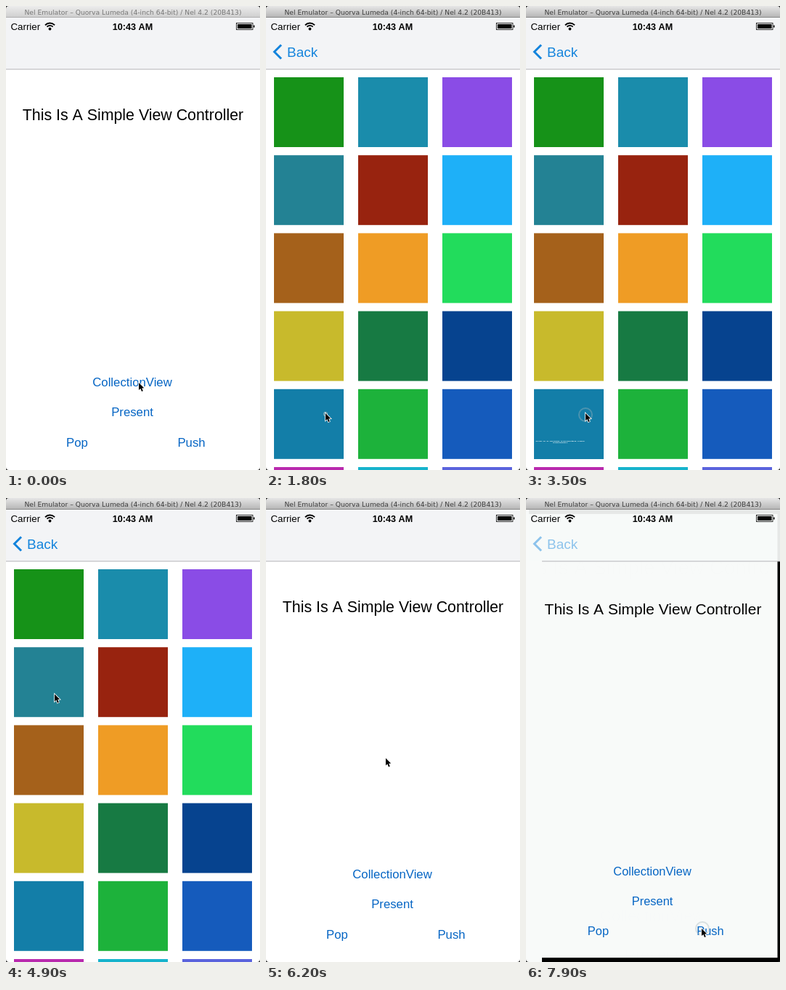
Write an HTML page with a canvas that moves like this. It is 350 px wide and 638 px high and loops after 8 s.

```html
<!DOCTYPE html>
<html lang="en">
<head>
<meta charset="utf-8">
<title>View transitions</title>
<style>
  html, body { margin: 0; width: 350px; height: 638px; overflow: hidden; background: #222; }
  canvas { display: block; border-radius: 4px; }
</style>
</head>
<body>
<canvas id="stage" width="350" height="638"></canvas>
<script>
const ctx = document.getElementById('stage').getContext('2d');
const W = 350, H = 638, TOP = 16, NAV = 87, LOOP = 8000;
const SANS = '"Liberation Sans", Arial, sans-serif';
const BLUE = '#0565c4', PAPER = '#f8faf9', PRESENTED = '#137ea8';
const CELLS = [
  '#169218', '#1a8cab', '#8a4ce6', '#238294', '#98230f', '#1eb0f8',
  '#a5611b', '#ef9c25', '#22dc5c', '#c8ba2c', '#177a43', '#06438f',
  PRESENTED, '#1db23b', '#155bbc', '#b92aae', '#16b3cc', '#5a63dd'
];
const CELL = { x: 11, y: 527, size: 96 };

// Start times of the transitions
const PUSH_GRID = 320, PRESENT = 1907, DISMISS = 3110, POP = 5524, PUSH_VIEW = 7620;

// Pointer path: time, x, y
const PATH = [
  [0, 183, 518], [950, 183, 518], [1400, 82, 560], [4300, 82, 560],
  [5300, 57, 77], [5500, 57, 77], [5600, 55, 103], [6600, 238, 527],
  [7000, 242, 592], [LOOP, 242, 592]
];
const CLICKS = [[200, 183, 519], [1800, 82, 561], [3100, 82, 562], [5400, 58, 78], [7500, 243, 592]];

const clamp = v => Math.max(0, Math.min(1, v));
const lerp = (a, b, p) => a + (b - a) * p;
const settle = (age, tau = 95) => {
  const p = 1 - Math.exp(-Math.max(0, age) / tau);
  return p > 0.997 ? 1 : p;
};

function rect(x, y, w, h, color) {
  ctx.fillStyle = color;
  ctx.fillRect(x, y, w, h);
}

function text(str, x, y, size, color, align = 'center', weight = '', family = SANS) {
  ctx.font = `${weight} ${size}px ${family}`;
  ctx.textAlign = align;
  ctx.fillStyle = color;
  ctx.fillText(str, x, y);
}

// Draws a screen scaled about the middle of the window, clipped to its own bounds
function zoomed(scale, alpha, draw) {
  if (alpha <= 0) return;
  ctx.save();
  ctx.globalAlpha = alpha;
  ctx.translate(W / 2, 327);
  ctx.scale(scale, scale);
  ctx.translate(-W / 2, -327);
  ctx.beginPath();
  ctx.rect(0, TOP, W, H - TOP);
  ctx.clip();
  draw();
  ctx.restore();
}

function labels(pressed) {
  text('This Is A Simple View Controller', 175, 157, 21.35, '#000');
  const link = (label, x, y) =>
    text(label, x, y, 16.75, label === pressed ? '#cbd6de' : BLUE);
  link('CollectionView', 174, 523);
  link('Present', 174, 564);
  link('Pop', 98, 606);
  link('Push', 255.5, 606);
}

const blank = (paper = '#fff') => rect(0, TOP, W, H - TOP, paper);

function simple(pressed, paper) {
  blank(paper);
  labels(pressed);
}

function grid() {
  blank();
  CELLS.forEach((color, i) =>
    rect(CELL.x + 116 * (i % 3), 98 + 107.2 * Math.floor(i / 3), CELL.size, CELL.size, color));
}

function navBar(back, paper = '#f3f4f6', lineFrom = 0) {
  ctx.globalAlpha = 0.93;
  rect(0, TOP, W, NAV - TOP, paper);
  ctx.globalAlpha = 1;
  rect(lineFrom, NAV - 0.5, W - lineFrom, 1, '#b4b4b7');
  ctx.globalAlpha = back;
  ctx.strokeStyle = '#1484dc';
  ctx.lineWidth = 3;
  ctx.beginPath();
  ctx.moveTo(21, 53.5);
  ctx.lineTo(11.5, 63);
  ctx.lineTo(21, 72.5);
  ctx.stroke();
  text('Back', 29, 69.5, 19, '#1484dc', 'left');
  ctx.globalAlpha = 1;
}

function statusBar() {
  text('Carrier', 6.5, 32.5, 13.3, '#000', 'left');
  text('10:43 AM', 174.5, 32.5, 12.6, '#000', 'center', 'bold');
  ctx.strokeStyle = '#000';
  ctx.lineWidth = 1.8;
  for (const r of [9, 5.6]) {
    ctx.beginPath();
    ctx.arc(60.5, 32.5, r, -Math.PI * 0.76, -Math.PI * 0.24);
    ctx.stroke();
  }
  ctx.fillStyle = '#000';
  ctx.beginPath();
  ctx.arc(60.5, 31.5, 1.9, 0, 7);
  ctx.fill();
  ctx.lineWidth = 0.8;
  ctx.strokeRect(317.5, 23.5, 22.5, 9);
  rect(319, 25, 19.5, 6, '#000');
  rect(341, 26.5, 1.5, 3, '#000');
}

function titleBar(active) {
  const fill = ctx.createLinearGradient(0, 0, 0, TOP);
  fill.addColorStop(0, active ? '#e6e6e6' : '#ececec');
  fill.addColorStop(1, active ? '#b4b4b4' : '#cecece');
  rect(0, 0, W, TOP, fill);
  rect(0, TOP - 1, W, 1, active ? '#8a8a8a' : '#b0b0b0');
  text('Nel Emulator – Quorva Lumeda (4-inch 64-bit) / Nel 4.2 (20B413)', 175, 12, 9.2,
    active ? '#3c3c3c' : '#777', 'center', '', '"DejaVu Sans", sans-serif');
}

// p = 0: inside its cell, p = 1: full screen
function presented(p) {
  ctx.globalAlpha = p;
  blank('#000');
  ctx.globalAlpha = 1;
  const x = lerp(CELL.x, 0, p), y = lerp(CELL.y, TOP, p);
  const right = lerp(CELL.x + CELL.size, W, p), bottom = lerp(CELL.y + CELL.size, H, p);
  rect(x, y, right - x, bottom - y, PRESENTED);
  ctx.save();
  ctx.translate(lerp(47, 175, p), lerp(599, 327, p));
  ctx.scale(lerp(0.21, 1, p), lerp(0.1, 1, p));
  ctx.strokeStyle = '#eaf5f8';
  ctx.lineWidth = 0.4;
  ['This is a Simple Presented View', 'Controller'].forEach((line, i) => {
    text(line, 0, -5 + 25.5 * i, 22.4, '#eaf5f8');
    ctx.strokeText(line, 0, -5 + 25.5 * i);
  });
  ctx.restore();
}

function screens(t) {
  rect(0, 0, W, H, '#000');
  if (t < PUSH_GRID) {
    simple(t >= 200 && 'CollectionView');
    navBar(0);
  } else if (t < POP) {
    const p = settle(t - PUSH_GRID);
    zoomed(lerp(0.64, 1, p), 1, grid);
    zoomed(lerp(1, 1.32, p), 1 - p, simple);
    navBar(clamp((t - PUSH_GRID) / 560));
    if (t >= PRESENT && t < DISMISS) presented(settle(t - PRESENT));
    else if (t >= DISMISS && t < 3900) presented(1 - settle(t - DISMISS, 60));
  } else if (t < PUSH_VIEW) {
    const p = settle(t - POP), scale = lerp(1.32, 1, p);
    if (p < 1) zoomed(lerp(1, 0.64, p), 1, grid);
    zoomed(scale, p, blank.bind(null, '#fff'));
    zoomed(scale, p ** 0.4, () => labels(t >= 7500 && 'Push'));
    navBar(p < 1 ? Math.exp((POP - t) / 38) : 0);
  } else {
    const p = settle(t - PUSH_VIEW);
    zoomed(lerp(0.64, 1, p), 1, () => simple('', PAPER));
    zoomed(lerp(1, 1.32, p), (1 - p) ** 2, () => simple('Push', PAPER));
    const settled = p > 0.8;
    if (settled) rect(0, NAV, 22, H - NAV, PAPER);
    navBar(clamp((t - PUSH_VIEW) / 600), PAPER, settled ? 22 : 0);
    if (settled) rect(0, TOP, 4, NAV - TOP, PAPER);
  }
}

function pointer(t) {
  for (const [start, x, y] of CLICKS) {
    const age = t - start;
    if (age < 0 || age > 480) continue;
    ctx.strokeStyle = `rgba(165,182,186,${0.85 * (1 - (age / 540) ** 2)})`;
    ctx.lineWidth = lerp(1, 2, clamp(age / 300));
    ctx.beginPath();
    ctx.arc(x, y, Math.min(9, 2.5 + age * 0.025), 0, 7);
    ctx.stroke();
  }
  const i = PATH.findIndex(k => k[0] > t);
  const [t0, x0, y0] = PATH[i - 1], [t1, x1, y1] = PATH[i];
  const p = (t - t0) / (t1 - t0);
  ctx.save();
  ctx.translate(lerp(x0, x1, p), lerp(y0, y1, p));
  ctx.beginPath();
  ctx.moveTo(0, 0);
  for (const [x, y] of [[0, 10], [2.3, 8], [4, 12], [5.8, 11.2], [4.2, 7.4], [7.2, 7.2]]) ctx.lineTo(x, y);
  ctx.closePath();
  ctx.strokeStyle = '#fff';
  ctx.lineWidth = 1.6;
  ctx.stroke();
  ctx.fillStyle = '#000';
  ctx.fill();
  ctx.restore();
}

const begin = performance.now();
function frame() {
  const t = (performance.now() - begin) % LOOP;
  screens(t);
  statusBar();
  titleBar(t >= 200);
  pointer(t);
  requestAnimationFrame(frame);
}
frame();
</script>
</body>
</html>
```
